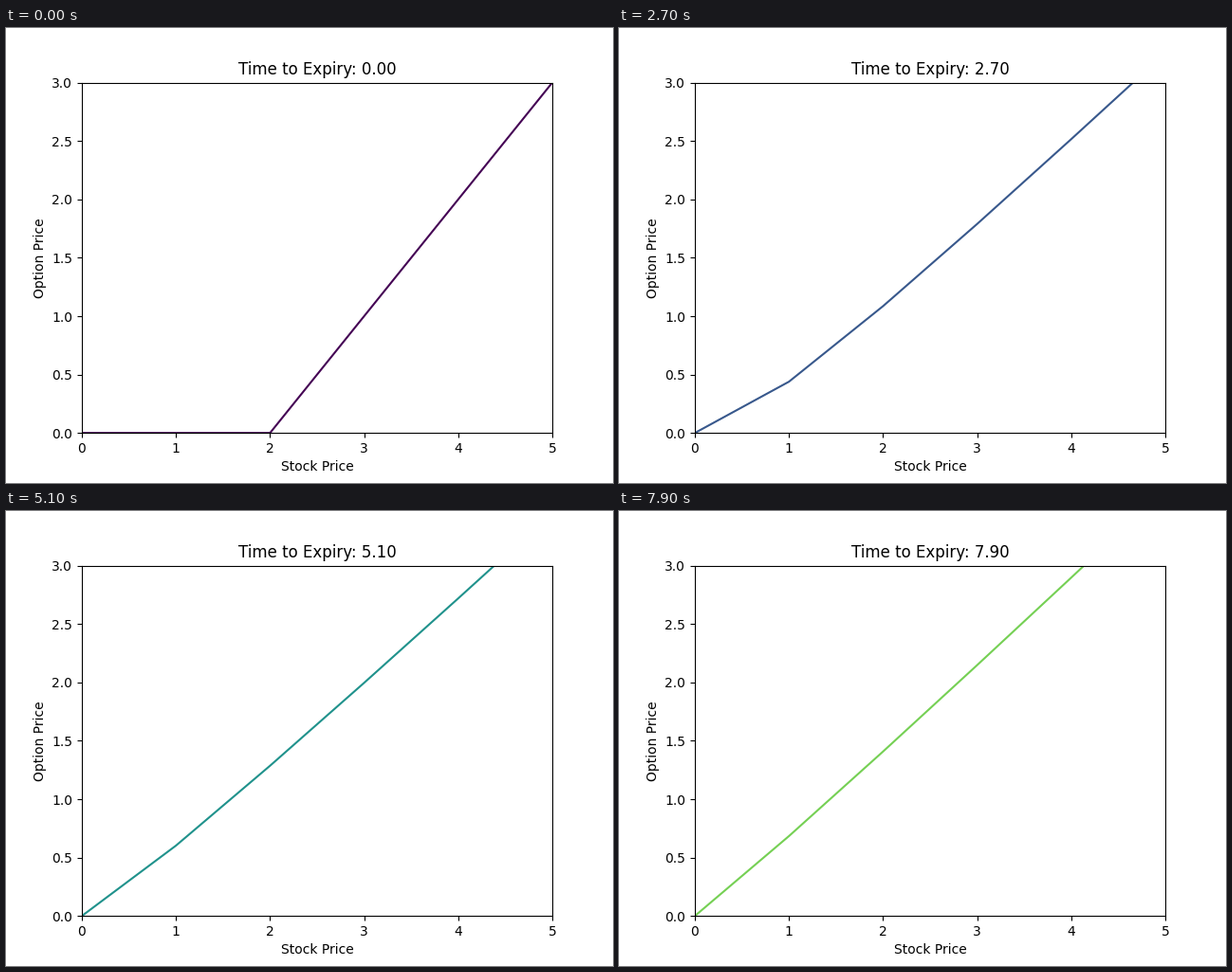
Recreate the animation shown at these times as a matplotlib script. Size 640x480 px, loop 8 s.

```python
import numpy as np
import matplotlib.pyplot as plt
from matplotlib.animation import FuncAnimation

S_MAX, STRIKE = 5, 2
RATE, SIGMA = 0.05, 1.0
T_MAX, DT, FRAMES = 10, 0.1, 80

stock = np.arange(S_MAX + 1)


def implicit_matrix():
    """Backward Euler operator for the Black-Scholes equation."""
    m = np.eye(S_MAX + 1)
    for k in range(1, S_MAX):
        diff = 0.5 * SIGMA**2 * k**2
        drift = 0.5 * RATE * k
        m[k, k - 1] = -DT * (diff - drift)
        m[k, k] = 1 + DT * (2 * diff + RATE)
        m[k, k + 1] = -DT * (diff + drift)
    return m


def solve():
    step = implicit_matrix()
    prices = [np.maximum(stock - STRIKE, 0.0)]
    for n in range(1, FRAMES):
        rhs = prices[-1].copy()
        rhs[0] = 0
        rhs[-1] = S_MAX - STRIKE * np.exp(-RATE * n * DT)
        prices.append(np.linalg.solve(step, rhs))
    return prices


prices = solve()

fig, ax = plt.subplots(figsize=(6.4, 4.8), dpi=100)
ax.set_xlim(0, S_MAX)
ax.set_ylim(0, S_MAX - STRIKE)
ax.set_xlabel("Stock Price")
ax.set_ylabel("Option Price")
title = ax.set_title("")
line, = ax.plot(stock, prices[0])


def update(n):
    t = n * DT
    line.set_ydata(prices[n])
    line.set_color(plt.cm.viridis(t / T_MAX))
    title.set_text(f"Time to Expiry: {t:.2f}")
    return line, title


anim = FuncAnimation(fig, update, frames=FRAMES, interval=100,
                     init_func=lambda: update(0), repeat=True, repeat_delay=0)
plt.show()
```
